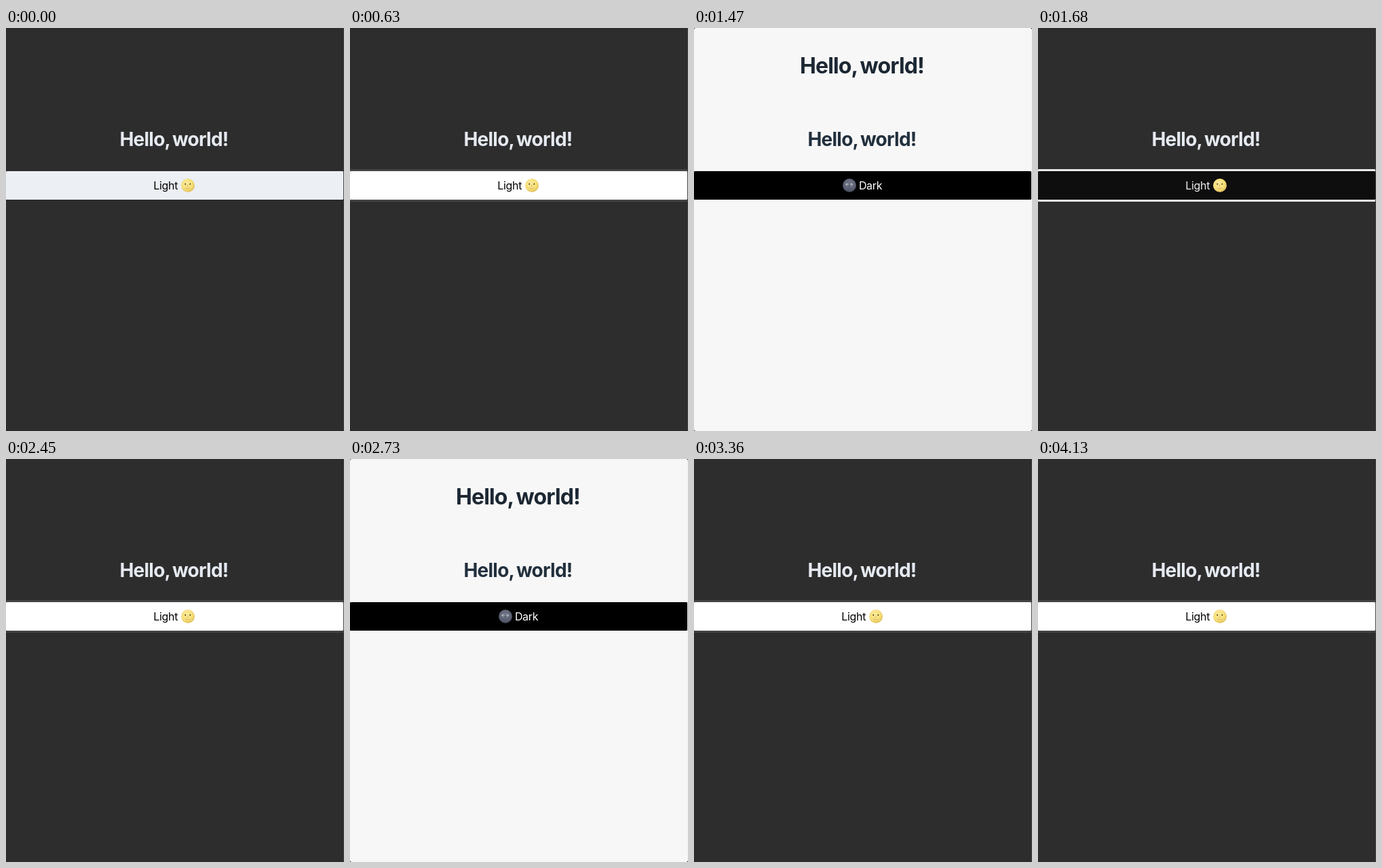
An HTML page that plays this animation: 498 px wide and 594 px high, repeating every 4200 ms.

```html
<!DOCTYPE html>
<html lang="en">
<head>
<meta charset="utf-8">
<title>Theme switch</title>
<style>
html, body { margin: 0; width: 100%; height: 100%; overflow: hidden; background: #2d2d2d; }
svg { display: block; width: 498px; height: 594px; }
text { font-family: Inter, "Open Sans", sans-serif; font-size: 16px; letter-spacing: -0.02em; }
.title { font-weight: 700; letter-spacing: -0.027em; word-spacing: -0.08em; text-anchor: middle; }
</style>
</head>
<body>
<svg viewBox="0 0 498 594">
  <defs>
    <radialGradient id="sunny" cx=".42" cy=".38" r=".65">
      <stop offset="0" stop-color="#fcec9c"/>
      <stop offset=".65" stop-color="#f5de78"/>
      <stop offset="1" stop-color="#dfba55"/>
    </radialGradient>
    <radialGradient id="dusky" cx=".5" cy=".4" r=".6">
      <stop offset="0" stop-color="#757a8c"/>
      <stop offset=".65" stop-color="#5f6477"/>
      <stop offset="1" stop-color="#444858"/>
    </radialGradient>
  </defs>
  <rect id="page" width="498" height="594"/>
  <text id="top" class="title" x="247.5" y="67" style="font-size:32px" fill="#1c2733">Hello, world!</text>
  <text id="heading" class="title" x="247.5" y="174" style="font-size:28px">Hello, world!</text>
  <rect id="border" x="-3" y="208" width="503.5" height="48" rx="5"/>
  <rect id="button" x="-1" y="211" width="499" height="42" rx="3"/>
  <rect id="edge" x="497" width="1" height="594"/>
  <path id="corners" fill="#555" d="M0 0h2L0 2zM498 0v2l-2-2zM0 594v-2l2 2zM498 594h-2l2-2z"/>
  <g id="lightLabel">
    <text x="217.3" y="238">Light</text>
    <circle cx="268" cy="232" r="10" fill="url(#sunny)"/>
    <ellipse cx="264.3" cy="230" rx=".9" ry="1.2" fill="#5d4a25"/>
    <ellipse cx="271.3" cy="230" rx=".9" ry="1.2" fill="#5d4a25"/>
    <path d="M267.6 230.5l-.6 3h1.4M264 236q3.7 2 7.4-.2" fill="none" stroke="#cfaa52" stroke-width=".8"/>
  </g>
  <g id="darkLabel">
    <circle cx="229" cy="232" r="10" fill="url(#dusky)"/>
    <ellipse cx="225.2" cy="230.5" rx="1.6" ry="1.3" fill="#e2e4ea"/>
    <ellipse cx="232.4" cy="230.5" rx="1.6" ry="1.3" fill="#e2e4ea"/>
    <circle cx="225.4" cy="230.6" r=".6" fill="#22252f"/>
    <circle cx="232.2" cy="230.6" r=".6" fill="#22252f"/>
    <path d="M228.7 231l-.6 3h1.4M225.4 236.3q3.5 1.7 7-.2" fill="none" stroke="#484c5c" stroke-width=".8"/>
    <text x="242.9" y="238">Dark</text>
  </g>
</svg>
<script>
const LOOP = 4200, STEP = 70, FADE = 200;
const $ = id => document.getElementById(id);

// Button looks: fill, border, label colour
const idle = [[236, 239, 244], [45, 45, 45], [0, 0, 0]];
const onDark = [[255, 255, 255], [68, 68, 68], [0, 0, 0]];
const onLight = [[0, 0, 0], [244, 246, 246], [255, 255, 255]];

const changes = [
  { at: 200, from: idle, to: onDark, light: false },
  { at: 885, from: onDark, to: onLight, light: true },
  { at: 1666, from: onLight, to: onDark, light: false },
  { at: 2505, from: onDark, to: onLight, light: true },
  { at: 3149, from: onLight, to: onDark, light: false }
];
const start = { at: -FADE, from: idle, to: idle, light: false };

// The CSS "ease" curve: cubic-bezier(.25, .1, .25, 1)
function ease(x) {
  if (x <= 0) return 0;
  if (x >= 1) return 1;
  const bezier = (a, b, u) => 3 * a * u * (1 - u) ** 2 + 3 * b * u * u * (1 - u) + u ** 3;
  let lo = 0, hi = 1;
  for (let i = 0; i < 24; i++) {
    const mid = (lo + hi) / 2;
    if (bezier(.25, .25, mid) < x) lo = mid; else hi = mid;
  }
  return bezier(.1, 1, lo);
}

const mix = (a, b, p) => `rgb(${a.map((v, i) => Math.round(v + (b[i] - v) * p))})`;
const fill = (id, color) => $(id).setAttribute("fill", color);
const show = (id, on) => $(id).setAttribute("visibility", on ? "visible" : "hidden");

function draw(time) {
  const t = Math.floor((time % LOOP) / STEP) * STEP;
  const { at, from, to, light } = changes.filter(c => c.at <= t).pop() || start;
  const p = ease((t - at) / FADE);
  const [face, rim, ink] = from.map((c, i) => mix(c, to[i], p));

  fill("page", light ? "#f7f7f7" : "#2d2d2d");
  fill("edge", light ? "#f0f0f0" : "#454545");
  fill("heading", light ? "#22303d" : "#e5e9f0");
  fill("button", face);
  fill("border", rim);
  fill("lightLabel", ink);
  fill("darkLabel", ink);
  show("top", light);
  show("corners", light);
  show("lightLabel", !light);
  show("darkLabel", light);
}

const origin = performance.now();
function tick() {
  draw(performance.now() - origin);
  requestAnimationFrame(tick);
}
tick();
</script>
</body>
</html>
```
